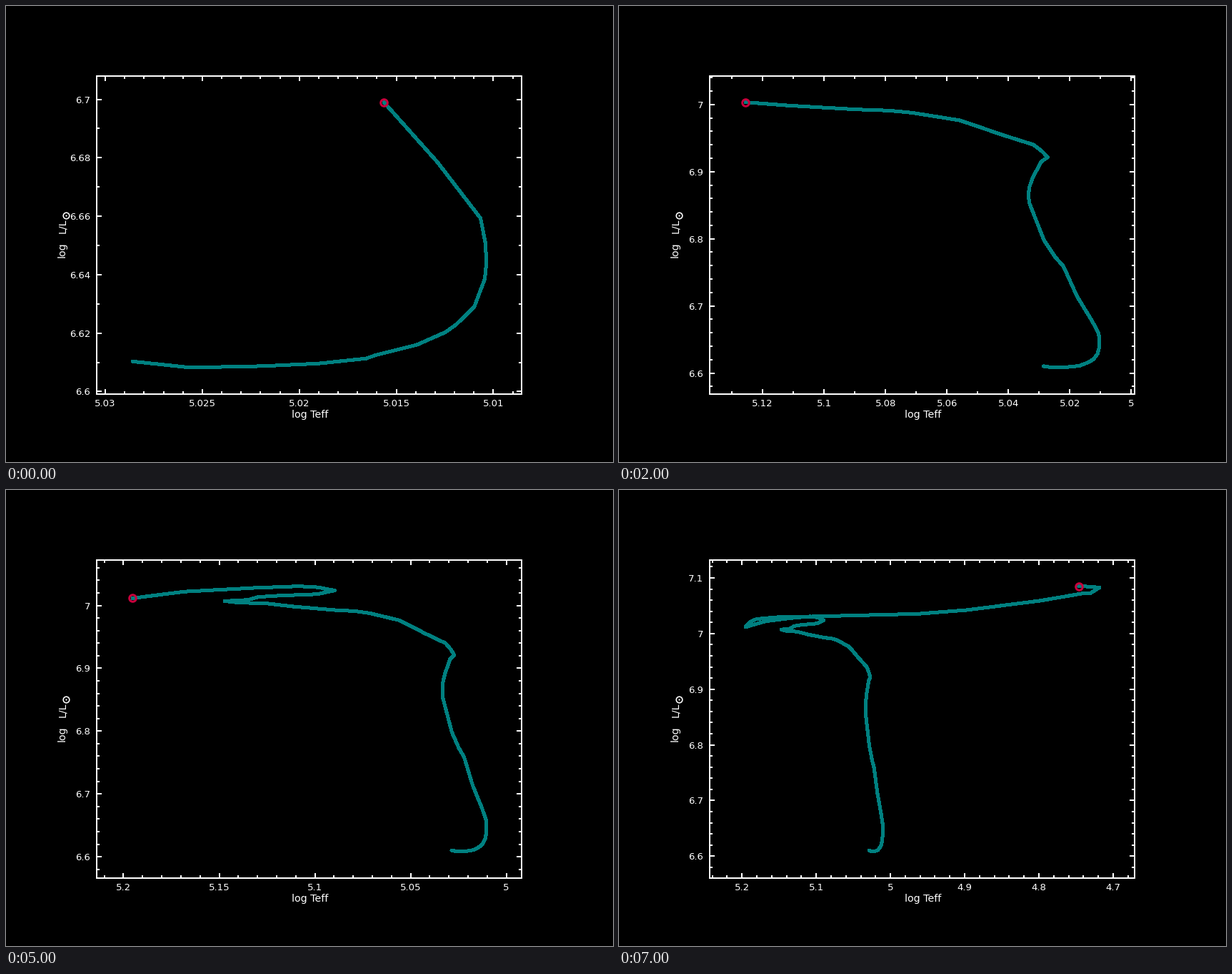
Recreate the animation shown at these times as a matplotlib script. Size 850 by 638 pixels, loop 8000 ms.

```python
import math

import numpy as np
import matplotlib.pyplot as plt
from matplotlib.animation import FuncAnimation
from matplotlib.collections import LineCollection

W, H, DPI = 850, 638, 100
PX = 72 / DPI
LEFT, RIGHT, TOP, BOTTOM = 127.5, 722.5, 97.5, 543
TEAL, CRIMSON = "#008080", "#c8003c"
TICK_FONT, TITLE_FONT = 13.2, 14.3

# New stretch of the track (log Teff, log L) added at each step
STAGES = [
    [(5.0286, 6.6103), (5.02562, 6.6082), (5.02186, 6.6087),
     (5.01899, 6.6096), (5.01656, 6.6113), (5.01604, 6.6125),
     (5.01394, 6.616), (5.01247, 6.6203), (5.01192, 6.6229),
     (5.01099, 6.6289), (5.01044, 6.6385), (5.01035, 6.6446),
     (5.01042, 6.6512), (5.01066, 6.6593), (5.01287, 6.6784),
     (5.01564, 6.699)],
    [(5.01764, 6.714), (5.0221, 6.759), (5.02476, 6.7727),
     (5.02845, 6.7981), (5.03309, 6.852), (5.03343, 6.8608),
     (5.03343, 6.8686), (5.03309, 6.8784), (5.03206, 6.8916),
     (5.02991, 6.9097), (5.0294, 6.9146), (5.02725, 6.9214),
     (5.02906, 6.9302), (5.0318, 6.94), (5.04262, 6.9557),
     (5.05292, 6.972)],
    [(5.0561, 6.9766), (5.0715, 6.9878), (5.0789, 6.991),
     (5.0893, 6.9926), (5.1114, 6.9984), (5.1256, 7.0034)],
    [(5.1395, 7.0045), (5.1472, 7.007)],
    [(5.1348, 7.009), (5.1298, 7.0135), (5.1188, 7.0157),
     (5.0989, 7.018), (5.0896, 7.024), (5.0939, 7.0261)],
    [(5.0979, 7.0289), (5.1084, 7.0307), (5.1319, 7.028),
     (5.1681, 7.0221), (5.1953, 7.0116)],
    [(5.1894, 7.0204), (5.1804, 7.0261), (5.1494, 7.0297),
     (5.1319, 7.0297)],
    [(4.9635, 7.0353), (4.8962, 7.0423), (4.7981, 7.059),
     (4.7394, 7.0724), (4.7308, 7.0724), (4.7183, 7.0827),
     (4.7356, 7.0845), (4.7462, 7.085)],
]


def window(values):
    lo, hi = min(values), max(values)
    pad = 0.1 * (hi - lo)
    return lo - pad, hi + pad


def ticks(lo, hi, share):
    """Yield (value, is_major) at round steps inside the window."""
    rough = share * (hi - lo)
    power = 10.0 ** math.floor(math.log10(rough))
    lead = next(m for m in (1, 2, 5, 10) if m * power >= rough)
    parts = 2 if lead == 2 else 5
    step = lead * power / parts
    for k in range(math.ceil(lo / step), math.floor(hi / step) + 1):
        yield k * step, k % parts == 0


def number(v):
    return f"{v:.3f}".rstrip("0").rstrip(".")


fig = plt.figure(figsize=(W / DPI, H / DPI), dpi=DPI, facecolor="black")
ax = fig.add_axes([0, 0, 1, 1])
ax.set_xlim(0, W)
ax.set_ylim(H, 0)
ax.axis("off")


def write(text, x, y, size, align, turn=0):
    return ax.text(x, y, text, color="white", family="DejaVu Sans",
                   size=size * PX, ha=align, va="baseline", rotation=turn,
                   rotation_mode="anchor")


write("log Teff", 425.5, 576, TITLE_FONT, "center")
write("log", 83, 351.5, TITLE_FONT, "left", 90)
write("L/L", 83, 298, TITLE_FONT, "right", 90)
ax.plot(84.5, 293, "o", ms=8.6 * PX, mfc="none", mec="white", mew=1.6 * PX)
ax.plot(84.5, 293, "o", ms=2.2 * PX, color="white", mew=0)

ax.plot([LEFT, RIGHT, RIGHT, LEFT, LEFT], [TOP, TOP, BOTTOM, BOTTOM, TOP],
        color="white", lw=2 * PX, antialiased=False,
        solid_joinstyle="miter", solid_capstyle="projecting")
tick_lines = LineCollection([], colors="white", linewidths=2 * PX,
                            antialiaseds=False, capstyle="butt")
ax.add_collection(tick_lines, autolim=False)
track, = ax.plot([], [], color=TEAL, lw=4 * PX, antialiased=False,
                 solid_joinstyle="round", solid_capstyle="round", zorder=4)
star, = ax.plot([], [], "o", ms=9.6 * PX, mfc="none", mec=CRIMSON,
                mew=3 * PX, zorder=5)
labels = []


def draw(step):
    points = np.array(sum(STAGES[:step + 1], []))
    x0, x1 = window(points[:, 0])
    y0, y1 = window(points[:, 1])

    def sx(v):
        return LEFT + (x1 - v) / (x1 - x0) * (RIGHT - LEFT)

    def sy(v):
        return BOTTOM - (v - y0) / (y1 - y0) * (BOTTOM - TOP)

    while labels:
        labels.pop().remove()

    marks = []
    for v, major in ticks(x0, x1, 0.11):
        x, n = sx(v), 7 if major else 4
        marks += [[(x, TOP), (x, TOP + n)], [(x, BOTTOM), (x, BOTTOM - n)]]
        if major:
            labels.append(write(number(v), x, 560, TICK_FONT, "center"))
    for v, major in ticks(y0, y1, 0.15):
        y, n = sy(v), 7 if major else 4
        marks += [[(LEFT, y), (LEFT + n, y)], [(RIGHT, y), (RIGHT - n, y)]]
        if major:
            labels.append(write(number(v), 118.5, y + 5, TICK_FONT, "right"))
    tick_lines.set_segments(marks)

    xs, ys = sx(points[:, 0]), sy(points[:, 1])
    track.set_data(xs, ys)
    star.set_data(xs[-1:], ys[-1:])
    return tick_lines, track, star, *labels


anim = FuncAnimation(fig, draw, frames=len(STAGES), interval=1000,
                     repeat=True, repeat_delay=0, blit=False)
plt.show()
```
